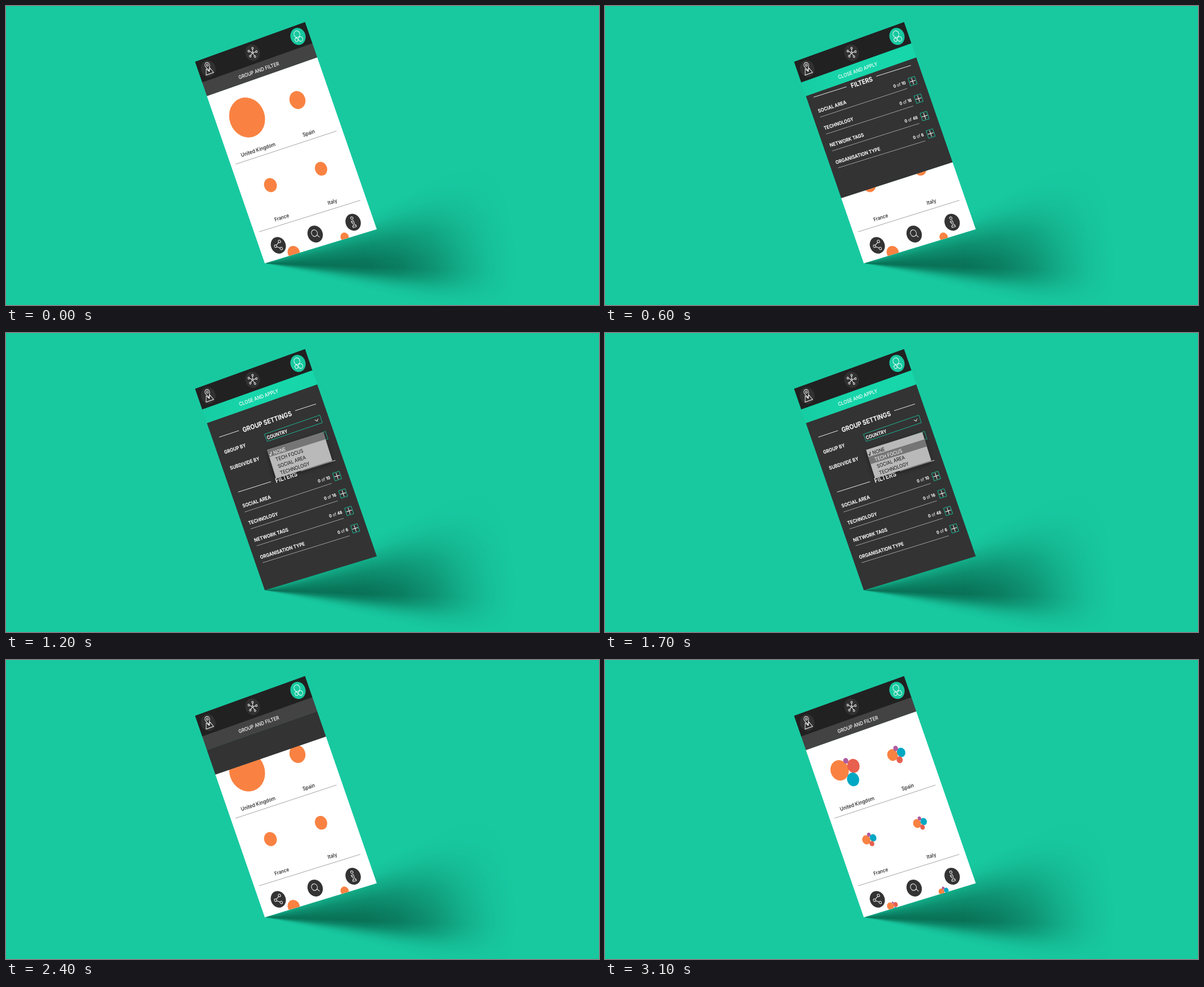
Recreate the animation shown at these times as an HTML page with a canvas. Size 1054 by 531 pixels, loop 6.1 s.

```html
<!DOCTYPE html>
<html lang="en">
<head>
<meta charset="utf-8">
<title>Group and filter</title>
<style>
html, body { margin: 0; height: 100%; overflow: hidden; background: #18c9a0; }
canvas, #shadow { position: absolute; left: 0; top: 0; width: 1054px; height: 531px; }
/* a fan of shade spreading from the corner the screen stands on */
#shadow {
  --c: 0 60 42;
  background: conic-gradient(at 460px 457px,
    rgb(var(--c) / 0) 64deg, rgb(var(--c) / .07) 69deg, rgb(var(--c) / .2) 73deg,
    rgb(var(--c) / .42) 80deg, rgb(var(--c) / .58) 88deg, rgb(var(--c) / .62) 92deg,
    rgb(var(--c) / .48) 95deg, rgb(var(--c) / .2) 98.5deg, rgb(var(--c) / .06) 101deg,
    rgb(var(--c) / 0) 104deg);
  mask-image: radial-gradient(circle at 460px 457px,
    #000 180px, rgb(0 0 0 / .87) 240px, rgb(0 0 0 / .62) 300px,
    rgb(0 0 0 / .33) 350px, rgb(0 0 0 / .1) 400px, transparent 445px);
}
</style>
</head>
<body>
<div id="shadow"></div>
<canvas id="stage" width="1054" height="531"></canvas>
<script>
const ctx = document.getElementById('stage').getContext('2d');
const LOOP = 6100, STEP = 100;
const GREEN = '#18c9a0', DARK = '#333', ORANGE = '#f98242', RED = '#e8604f', TEAL = '#00a8c4', PURPLE = '#b05ca0';
const BAR = 0.1025, TOP = 0.1705; // lower edges of header and title band, as parts of the screen height
const SPAN = 1 - TOP;

// Clusters: [dx, dy, radius, colour], scaled per bubble
const WIDE = [[-11.5, -2, 15.4, ORANGE], [13, -10, 10.5, RED], [12.5, 14, 10.3, TEAL], [-0.5, -19, 4.3, PURPLE]];
const TIGHT = [[-7, 1.8, 8.9, ORANGE], [8.4, -2.9, 7.1, TEAL], [5.7, 10.2, 5.2, RED], [-1.4, -10, 4, PURPLE]];
// Bubbles: x, y, radius, cluster, cluster scale
const BUBBLES = [
  [428.5, 198, 30.2, WIDE, 1], [518, 167, 13.5, TIGHT, 1],
  [470, 318, 10.7, TIGHT, 0.78], [560, 289, 10.4, TIGHT, 0.76],
  [511.5, 438, 10.3, WIDE, 0.37], [602, 410.5, 7, TIGHT, 0.55]
];

const swing = p => 0.5 - Math.cos(Math.PI * Math.min(1, Math.max(0, p))) / 2;

// Runs draw in the tilted plane of the screen with (x, y) as its zero point
function at(x, y, draw) {
  const v = (195.5 * (y - 99) + 70.5 * (x - 336)) / 78731;
  ctx.save();
  ctx.transform((195.5 + 3.5 * v) / 200, (-70.5 + 10 * v) / 200, 0.39, 1.128, x, y);
  draw();
  ctx.restore();
}

function poly(points, close = true) {
  ctx.beginPath();
  points.forEach(p => ctx.lineTo(...p));
  if (close) ctx.closePath();
}

// Outline of the part of the screen between two heights
function band(v1, v2) {
  const left = v => [336 + 124 * v, 99 + 358 * v];
  const right = v => [531.5 + 127.5 * v, 28.5 + 368 * v];
  poly([left(v1), right(v1), right(v2), left(v2)]);
}

function strip(v1, v2, color) {
  band(v1, v2);
  ctx.fillStyle = color;
  ctx.fill();
}

function line(x1, y1, x2, y2, color = '#fff', width = 0.9) {
  poly([[x1, y1], [x2, y2]], false);
  ctx.strokeStyle = color;
  ctx.lineWidth = width;
  ctx.stroke();
}

function font(size, weight) {
  ctx.font = `${weight} ${size}px Inter, Lato, sans-serif`;
}

function text(str, x, y, size, weight = 700, color = '#fff', align = 'center') {
  at(x, y, () => {
    font(size, weight);
    ctx.textAlign = align;
    ctx.fillStyle = color;
    ctx.fillText(str, 0, size * 0.36);
  });
}

function disc(x, y, r, color) {
  at(x, y, () => {
    ctx.beginPath();
    ctx.arc(0, 0, r, 0, 7);
    ctx.fillStyle = color;
    ctx.fill();
  });
}

function ring(x, y, r) {
  ctx.beginPath();
  ctx.arc(x, y, r, 0, 7);
  ctx.stroke();
}

function path(points, close) {
  poly(points, close);
  ctx.stroke();
}

function icon(x, y, r, color, glyph) {
  disc(x, y, r, color);
  at(x, y, () => {
    ctx.strokeStyle = '#fff';
    ctx.lineWidth = 0.85;
    glyph();
  });
}

const glyphs = {
  map() {
    path([[-7, 8], [-3.5, -0.5], [0, 4.5], [3.2, 0], [6.5, 8]]);
    ctx.beginPath();
    ctx.arc(0.5, -5.5, 4, 2.7, 6.72);
    ctx.lineTo(0, 3);
    ctx.closePath();
    ctx.stroke();
    ring(0.5, -5.5, 1.6);
  },
  network() {
    ring(0, 0, 1.2);
    for (let i = 0; i < 5; i++) {
      const a = i * Math.PI * 0.4 - 1.2, c = Math.cos(a), s = Math.sin(a);
      path([[1.2 * c, 1.2 * s], [5.4 * c, 5.4 * s]], false);
      ring(6.8 * c, 6.8 * s, 1.4);
    }
  },
  groups() {
    ring(-0.5, -3.7, 5);
    ring(-4.3, 4, 2.6);
    ring(2.8, 4.9, 3.6);
  },
  share() {
    path([[2.2, -4], [-3.2, -1]], false);
    path([[1.4, 4.6], [-3.5, 1.2]], false);
    ring(-5, 0, 2);
    ring(4, -5, 2);
    ring(3, 5.8, 2);
  },
  search() {
    ring(-0.7, -1.6, 5);
    path([[2.6, 2.2], [5.4, 6.4]], false);
  },
  info() {
    ring(0.2, -6.3, 2);
    path([[-2.6, -2], [1.4, -2], [1.4, 5.2], [3, 5.2], [3, 7.6], [-3, 7.6], [-3, 5.2], [-1, 5.2], [-1, 0.3], [-2.6, 0.3]]);
  }
};

function results(t) {
  const q = t >= 2500 && 1 - (1 - Math.min(1, (t - 2500) / 600)) ** 2;
  for (const [x, y, r, cluster, scale] of BUBBLES) {
    cluster.forEach(([dx, dy, size, color], i) => {
      const start = i ? 0 : r;
      const radius = start + (size * scale - start) * q;
      if (radius > 0) disc(x + dx * scale * q, y + dy * scale * q, radius, color);
    });
  }
  line(408, 281, 587.5, 222, '#999');
  line(450, 401, 630, 345, '#999');
  text('United Kingdom', 448, 255, 8, 500, '#222');
  text('Spain', 538, 225.5, 8, 500, '#222');
  text('France', 490, 375.5, 7.8, 500, '#222');
  text('Italy', 580, 347.5, 8, 500, '#222');
  icon(484, 425, 12.6, DARK, glyphs.share);
  icon(549.5, 405, 12.8, DARK, glyphs.search);
  icon(617, 384, 12.8, DARK, glyphs.info);
}

function select(x, y, value) {
  poly([[x, y], [x + 98.5, y - 34], [x + 103, y - 20.5], [x + 5, y + 12.8]]);
  ctx.strokeStyle = GREEN;
  ctx.lineWidth = 0.85;
  ctx.stroke();
  text(value, x + 4.3, y + 6.5, 7.4, 700, '#fff', 'left');
  at(x + 93, y - 25, () => {
    ctx.strokeStyle = '#fff';
    ctx.lineWidth = 0.8;
    path([[-3, -1.5], [0, 1.5], [3, -1.5]], false);
  });
}

function filterRow(i, label, count) {
  const x = 10.7 * i, y = 30.4 * i;
  text(label, 420.5 + x - i * 0.3, 307.3 + y, 7.5, 700, '#fff', 'left');
  line(424 + x, 318 + y - i * 0.4, 579 + x, 267 + y + i * 0.6, '#c4c4c4', 0.75);
  at(576 + x, 256.3 + y + i * 0.4, () => {
    let end = 0;
    ctx.textAlign = 'right';
    ctx.fillStyle = '#fff';
    for (const [part, weight] of [[count, 700], [' of ', 400], ['0', 700]]) {
      font(6.6, weight);
      ctx.fillText(part, end, 2.4);
      end -= ctx.measureText(part).width;
    }
  });
  at(588.5 + x, 254 + y + i * 0.6, () => {
    ctx.strokeStyle = GREEN;
    ctx.lineWidth = 0.75;
    ctx.strokeRect(-5.9, -5.9, 11.8, 11.8);
    ctx.strokeStyle = '#fff';
    ctx.lineWidth = 0.9;
    path([[-4.9, 0], [4.9, 0]], false);
    path([[0, -4.9], [0, 4.9]], false);
  });
}

function menu(active) {
  const row = (a, b) => poly([[464 + 4 * a, 207.5 + 12.7 * a], [564 + 4 * a, 176 + 12.7 * a], [564 + 4 * b, 176 + 12.7 * b], [464 + 4 * b, 207.5 + 12.7 * b]]);
  ctx.save();
  ctx.shadowColor = 'rgba(0,0,0,.4)';
  ctx.shadowBlur = 8;
  ctx.shadowOffsetY = 3;
  row(0, 4);
  ctx.fillStyle = '#b9b9b9';
  ctx.fill();
  ctx.restore();
  row(active, active + 1);
  ctx.fillStyle = '#757575';
  ctx.fill();
  ['NONE', 'TECH FOCUS', 'SOCIAL AREA', 'TECHNOLOGY'].forEach((name, i) =>
    text(name, 475.5 + 4 * i, 213 + 11.9 * i, 7.6, 400, i === active ? '#fff' : '#111', 'left'));
  at(470.5, 214.5, () => {
    ctx.strokeStyle = active ? '#111' : '#fff';
    ctx.lineWidth = 1;
    path([[-2, 0.3], [-0.6, 2.2], [2, -2.6]], false);
  });
}

function panel(t, open) {
  const lift = (open - 1) * SPAN * 1.03;
  band(TOP, TOP + SPAN * open);
  ctx.clip();
  ctx.translate(125.5 * lift, 362 * lift);
  text('GROUP SETTINGS', 464, 157.5, 10);
  line(379, 185, 414, 173.3);
  line(514, 138, 551, 126);
  text('GROUP BY', 407, 205.5, 7.5);
  text('SUBDIVIDE BY', 424.3, 231.5, 7.5);
  select(459.3, 179.8, 'COUNTRY');
  select(469.3, 208.8, t < 2200 ? 'NONE' : 'TECH FOCUS');
  text('FILTERS', 498, 256, 9.9);
  line(412.5, 282.5, 471, 264);
  line(524, 245.3, 585.5, 226);
  ['SOCIAL AREA 10', 'TECHNOLOGY 16', 'NETWORK TAGS 48', 'ORGANISATION TYPE 6'].forEach((entry, i) => {
    const cut = entry.lastIndexOf(' ');
    filterRow(i, entry.slice(0, cut), entry.slice(cut + 1));
  });
  if (t >= 1200 && t < 2200) menu(t < 1700 ? 0 : 1);
}

function header(active) {
  const glow = ctx.createLinearGradient(350, 0, 440, 0);
  glow.addColorStop(0, '#17cda3');
  glow.addColorStop(1, '#16d6aa');
  strip(BAR - 0.001, TOP, active ? glow : '#434343');
  strip(0, BAR, '#212121');
  text(active ? 'CLOSE AND APPLY' : 'GROUP AND FILTER', 449.2, 114.5, 7.7, 500);
  icon(359.5, 111.3, 12.4, '#313131', glyphs.map);
  icon(438.3, 83, 12.4, '#313131', glyphs.network);
  icon(519, 54, 12.9, GREEN, glyphs.groups);
}

function draw(t) {
  const open = t < 2200 ? swing((t - 467) / 233) : 1 - swing((t - 2181) / 292);
  const edge = TOP + SPAN * open;
  ctx.clearRect(0, 0, 1054, 531);
  if (open < 1) {
    strip(edge - 0.001, 1, '#fff');
    ctx.save();
    ctx.clip();
    results(t);
    ctx.restore();
  }
  if (open > 0) {
    strip(TOP - 0.001, edge, DARK);
    ctx.save();
    panel(t, open);
    ctx.restore();
  }
  header(t >= 500 && t < 2200);
}

const begin = performance.now();
let shown = -1;
function tick() {
  const t = Math.floor((performance.now() - begin) % LOOP / STEP) * STEP;
  if (t !== shown) draw(shown = t);
  requestAnimationFrame(tick);
}
tick();
</script>
</body>
</html>
```
